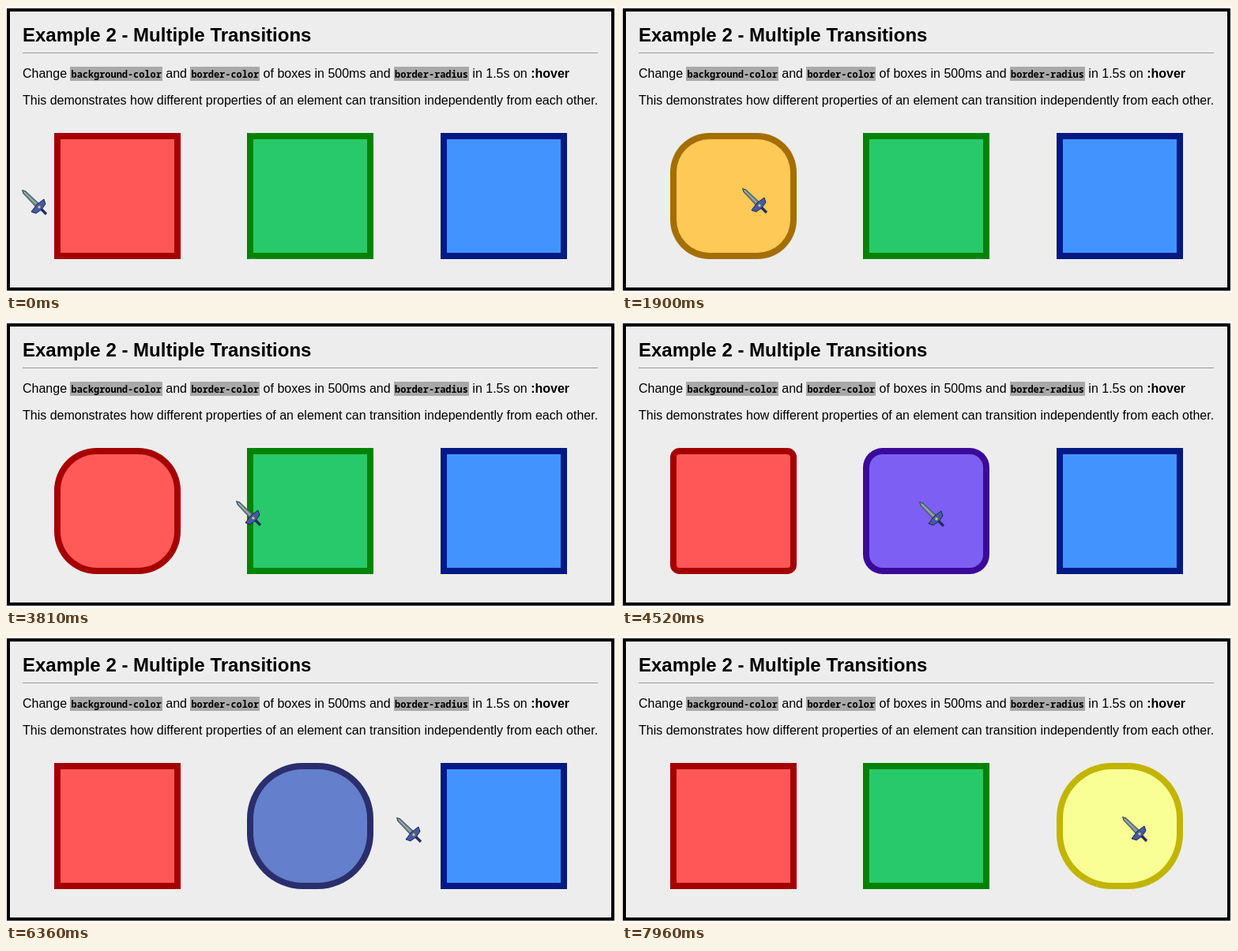
Recreate the animation shown at these times as an HTML page. Size 772 px wide and 364 px high, loop 7.99 s.

```html
<!DOCTYPE html>
<html lang="en">
<head>
<meta charset="utf-8">
<title>Multiple Transitions</title>
<style>
html, body { margin: 0; width: 772px; height: 364px; overflow: hidden; background: #fff; }
svg { display: block; }
text { font: 16px "Liberation Sans", Arial, sans-serif; }
.title { font-size: 24px; }
.title, .strong, .code { font-weight: bold; }
.code { font-family: "Noto Sans Mono", monospace; font-size: 11.91px; }
</style>
</head>
<body>
<svg width="772" height="364" viewBox="0 0 772 364">
  <rect x="1" y="3" width="769" height="358"/>
  <rect x="5" y="7" width="761" height="350" fill="#ededed"/>
  <text class="title" x="21" y="45">Example 2 - Multiple Transitions</text>
  <rect x="21" y="59" width="728" height="1" fill="#999"/>
  <g fill="#a9a9a9">
    <rect x="81" y="77" width="117" height="18"/>
    <rect x="233" y="77" width="88" height="18"/>
    <rect x="491" y="77" width="95" height="18"/>
  </g>
  <text x="21" y="91">Change <tspan class="code" dx="1">background-color</tspan><tspan dx="1"> and </tspan><tspan class="code" dx="1">border-color</tspan><tspan dx="1"> of boxes in 500ms and </tspan><tspan class="code" dx="1">border-radius</tspan><tspan dx="1"> in 1.5s on </tspan><tspan class="strong">:hover</tspan></text>
  <text x="21" y="125">This demonstrates how different properties of an element can transition independently from each other.</text>
  <g id="boxes"></g>
  <g id="sword" stroke-linejoin="round">
    <path d="M.5 .5 5 2 22 18 18 22 2 5Z" fill="#72898f" stroke="#34464c"/>
    <path d="M3 3 18 18" stroke="#b4c6ca"/>
    <path d="M22 22 31 31" stroke="#232d60" stroke-width="3.4"/>
    <path d="M28 12 30 18 25 25 18 30 12 28 18 20 20 18Z" fill="#4459a5" stroke="#1c2550"/>
    <circle cx="22" cy="22" r="1.7" fill="#d8c85a"/>
  </g>
</svg>
<script>
const LOOP = 7990, COLOR_MS = 450, RADIUS_MS = 1350;

const boxes = [
  { on: 1063, off: 3371, fill: ["#ff5757", "#ffc957"], border: ["#a50000", "#a56e00"] },
  { on: 4104, off: 6203, fill: ["#28c96b", "#8457ff"], border: ["#038303", "#3f00a5"] },
  { on: 6780, off: LOOP, fill: ["#4393ff", "#f9ff94"], border: ["#001a85", "#c1b500"] }
];

const home = { x: 20, y: 233 };
const moves = [
  { from: 770, to: 1510, x: 152, y: 231 },
  { from: 3000, to: 3810, x: 291, y: 228 },
  { from: 4000, to: 4600, x: 380, y: 229 },
  { from: 5820, to: 6640, x: 536, y: 231 },
  { from: 6640, to: 7300, x: 633, y: 229 }
];

const clamp = v => Math.max(0, Math.min(1, v));
const smooth = k => k * k * (3 - 2 * k);
const blend = ([a, b], k) => `color-mix(in srgb, ${b} ${100 * k}%, ${a})`;
const hover = (t, box, ms) => clamp((t - box.on) / ms) - clamp((t - box.off) / ms);

function addRect(x, y, size) {
  const rect = document.createElementNS("http://www.w3.org/2000/svg", "rect");
  for (const [name, value] of Object.entries({ x, y, width: size, height: size }))
    rect.setAttribute(name, value);
  return document.getElementById("boxes").appendChild(rect);
}

function paint(rect, radius, fill) {
  rect.setAttribute("rx", Math.max(0, radius));
  rect.style.fill = fill;
}

boxes.forEach((box, i) => {
  const x = Math.floor(61 + 244.5 * i);
  box.outer = addRect(x, 161, 160);
  box.inner = addRect(x + 8, 169, 144);
});
const sword = document.getElementById("sword");

function draw(t) {
  for (const box of boxes) {
    const k = hover(t, box, COLOR_MS);
    const r = 80 * hover(t, box, RADIUS_MS);
    paint(box.outer, r, blend(box.border, k));
    paint(box.inner, r - 8, blend(box.fill, k));
  }
  let { x, y } = home;
  for (const m of moves) {
    const k = smooth(clamp((t - m.from) / (m.to - m.from)));
    x += (m.x - x) * k;
    y += (m.y - y) * k;
  }
  sword.setAttribute("transform", `translate(${Math.round(x)} ${Math.round(y)})`);
}

const start = performance.now();
function tick() {
  draw((performance.now() - start) % LOOP);
  requestAnimationFrame(tick);
}
tick();
</script>
</body>
</html>
```
